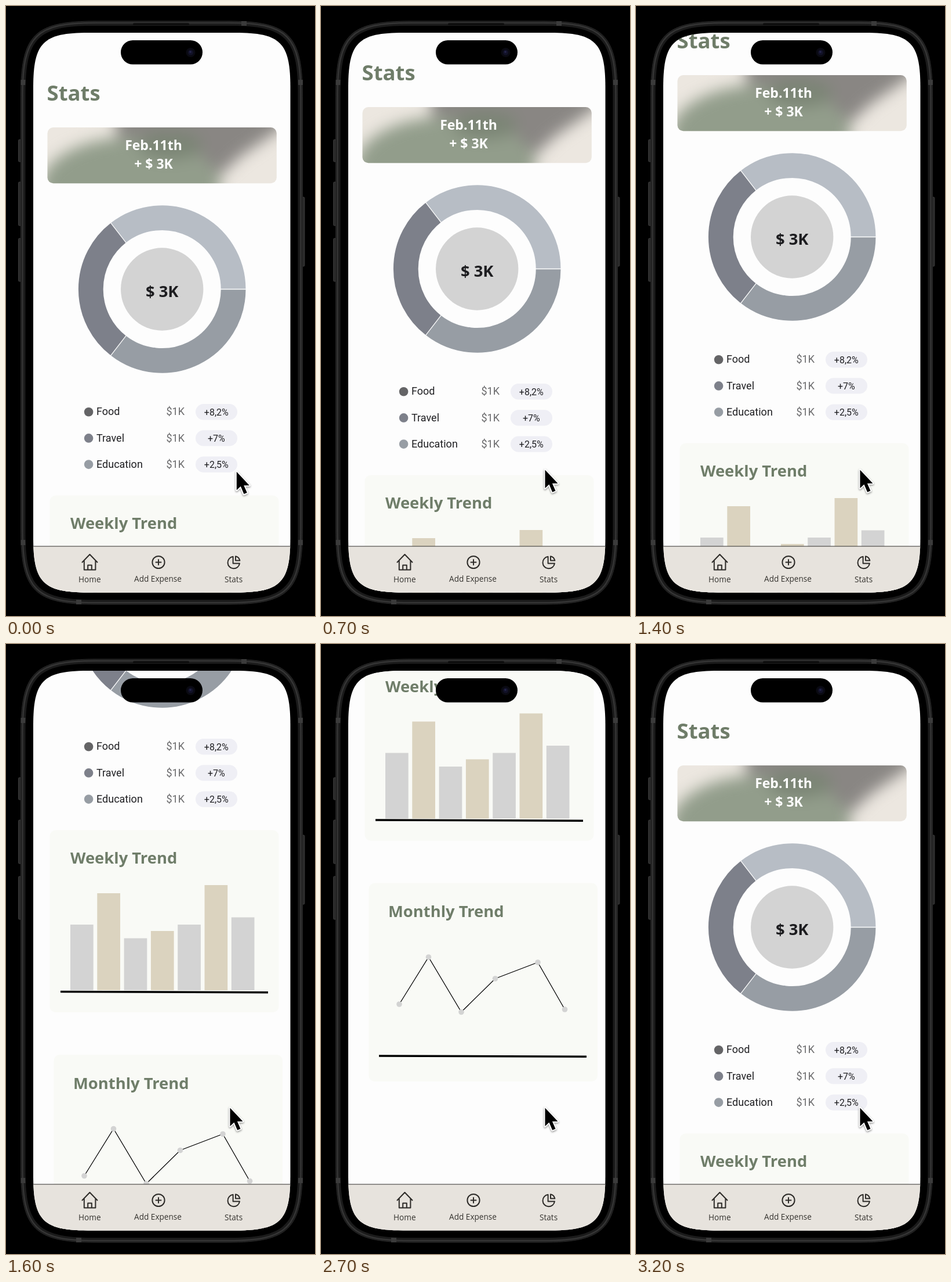
Write an HTML page that moves like this. It is 533 px wide and 1050 px high and loops after 3400 ms.

```html
<!DOCTYPE html>
<html lang="en">
<head>
<meta charset="utf-8">
<title>Stats screen</title>
<style>
  html, body { margin: 0; width: 100%; height: 100%; overflow: hidden; background: #000; }
  svg { display: block; width: 100vw; height: 100vh; }
  text { font-family: "Open Sans", "Noto Sans", sans-serif; white-space: pre; }
  .bold { font-weight: 700; }
  .mid { text-anchor: middle; }
  .head { font-size: 27.4px; fill: #6f7d69; }
  .list text { font-family: Roboto, sans-serif; font-size: 18px; fill: #1f1f22; }
  .list .sum { fill: #68686a; }
  .list .pct { font-size: 16px; }
  .tabs text { font-size: 13.6px; fill: #35332f; text-anchor: middle; }
  .icon { fill: none; stroke: #2d2b28; stroke-width: 2; stroke-linejoin: round; stroke-linecap: round; }
</style>
</head>
<body>
<svg id="stage" viewBox="0 0 533 1050"></svg>
<script>
const LOOP = 3400, STEP = 100;

// [ms, offset] pairs
const SCROLL = [
  [0, 0], [200, 0], [700, 35], [1200, 70], [1300, 77], [1400, 90], [1500, 285],
  [1600, 522], [1700, 715], [1800, 817.5], [2700, 817.5], [2800, 745],
  [2900, 545], [3000, 270], [3100, 70], [3200, 0], [LOOP, 0]
];
// [ms, share of the pointer's path]
const POINTER = [[0, 0], [100, .45], [200, .85], [300, 1], [LOOP, 1]];

const rect = (x, y, w, h, r, fill, more = '') =>
  `<rect x="${x}" y="${y}" width="${w}" height="${h}" rx="${r}" fill="${fill}" ${more}/>`;
const text = (x, y, str, cls = '', more = '') =>
  `<text x="${x}" y="${y}" class="${cls}" ${more}>${str}</text>`;
const disc = (x, y, r, fill) => `<circle cx="${x}" cy="${y}" r="${r}" fill="${fill}"/>`;
const line = (x1, y1, x2, y2, color, width) =>
  `<path d="M${x1} ${y1}L${x2} ${y2}" stroke="${color}" stroke-width="${width}"/>`;

// Rounded box with continuous corners
function squircle(x, y, w, h, r) {
  const e = r * 1.528, c = r * .272, X = x + w, Y = y + h;
  return `M${x + e} ${y}H${X - e}C${X - c} ${y} ${X} ${y + c} ${X} ${y + e}` +
    `V${Y - e}C${X} ${Y - c} ${X - c} ${Y} ${X - e} ${Y}` +
    `H${x + e}C${x + c} ${Y} ${x} ${Y - c} ${x} ${Y - e}` +
    `V${y + e}C${x} ${y + c} ${x + c} ${y} ${x + e} ${y}Z`;
}

function phone() {
  const button = (x, y, h) => rect(x, y, 5, h, 1.5, '#292929', 'stroke="#444" stroke-width=".8"');
  const band = (x, y, w, h) => rect(x, y, w, h, 0, '#3b3b3b');
  return button(21.5, 230, 38) + button(21.5, 303, 75) + button(21.5, 400, 74) + button(510, 329, 119) +
    `<path d="${squircle(25.5, 26, 486, 1004, 85)}" fill="#1b1b1b" stroke="#2b2b2b"/>
     <path d="${squircle(28.5, 29, 480, 998, 82)}" fill="none" stroke="#353535" stroke-width="2.5"/>` +
    band(25.5, 127, 8, 9) + band(504, 127, 8, 9) + band(25.5, 919, 8, 9) + band(504, 919, 8, 9) +
    band(406, 26, 9, 8) + band(121, 1022, 9, 8) +
    `<path d="${squircle(33.5, 34, 470, 988, 77)}" fill="#000"/>` +
    rect(219, 29.5, 97, 3, 1.5, '#0a0a0a');
}

function banner() {
  return `<g clip-path="url(#bannerClip)">` + rect(71, 209, 397, 97, 0, '#ece7e0') +
    `<g filter="url(#soft)">
      <path d="M185 180H500L470 214L405 258L360 300L200 262Z" fill="#898683"/>
      <ellipse cx="215" cy="312" rx="155" ry="86" fill="#929d8b"/>
      <ellipse cx="283" cy="240" rx="55" ry="24" fill="#7b8575"/>
    </g></g>` +
    text(254.5, 248, 'Feb.11th', 'bold mid', 'font-size="23" fill="#fff"') +
    text(254.5, 279.5, '+ $ 3K', 'bold mid', 'font-size="23" fill="#fff"');
}

function donut() {
  const cx = 269.2, cy = 487.5, r = 122.9, half = 21.4, split = 127.8;
  const at = (deg, d) => {
    const a = deg * Math.PI / 180;
    return `${cx + d * Math.cos(a)} ${cy - d * Math.sin(a)}`;
  };
  const arc = (a, b, color) =>
    `<path d="M${at(a, r)}A${r} ${r} 0 0 0 ${at(b, r)}" fill="none" stroke="${color}" stroke-width="${2 * half}"/>`;
  const gap = a =>
    `<path d="M${at(a, r - half - 1)}L${at(a, r + half + 1)}" stroke="#fdfdfd" stroke-width="1.3"/>`;
  return arc(0, split, '#b7bdc5') + arc(split, 360 - split, '#7d808a') + arc(360 - split, 360, '#979da4') +
    [0, split, 360 - split].map(gap).join('') +
    disc(cx, cy, 71.2, '#d3d3d3') +
    text(cx, 500.5, '$ 3K', 'bold mid', 'font-size="27.4" fill="#1d1d20"');
}

function list() {
  const rows = [['Food', '+8,2%', '#646466'], ['Travel', '+7%', '#7d808a'], ['Education', '+2,5%', '#979da4']];
  return '<g class="list">' + rows.map(([name, pct, color], i) => {
    const y = 698.7 + i * 45.2;
    return disc(142.6, y, 7.8, color) + text(156, y + 5.7, name) + text(276.5, y + 5.7, '$1K', 'sum') +
      rect(327, y - 13.7, 72, 27.4, 13.7, '#efeff5') + text(362.8, y + 5.8, pct, 'pct mid');
  }).join('') + '</g>';
}

function weekly() {
  const tops = [1005, 951, 1028.5, 1016, 1005, 937, 992.5], base = 1118;
  return rect(75.5, 842.5, 395, 313.5, 10, '#f9faf6') + text(111, 900, 'Weekly Trend', 'bold head') +
    tops.map((y, i) => rect(111 + i * 46.3, y, 39.7, base - y, 0, i % 2 ? '#dbd3bf' : '#d3d3d3')).join('') +
    line(94, 1120.6, 452, 1121.7, '#000', 3.5);
}

function monthly() {
  const pts = [[135, 1437.5], [185.5, 1356.5], [242, 1451], [300.5, 1393.5], [374, 1365.5], [420.5, 1446.5]];
  return rect(82.5, 1229, 394.5, 341.5, 10, '#f9faf6') + text(116, 1287.5, 'Monthly Trend', 'bold head') +
    `<polyline points="${pts}" fill="none" stroke="#000" stroke-width="1.3"/>` +
    pts.map(([x, y]) => disc(x, y, 4.8, '#d3d3d3')).join('') +
    line(100, 1526.6, 458, 1527.8, '#000', 3.5);
}

function tabs() {
  return '<g class="tabs">' + rect(47, 930, 444, 80, 0, '#e7e3dd') + line(47, 930, 491, 930, '#302f2d', 1.2) +
    `<path class="icon" d="M131.5 957.5L144.5 944L157.5 957.5M134.8 954.5V970.5H154.4V954.5M141.2 970.5V962.5H147.8V970.5"/>
     <path class="icon" d="M252.4 957.5a10.6 10.6 0 1 0 21.2 0a10.6 10.6 0 1 0 -21.2 0M258.5 957.5H267.5M263 953V962"/>
     <path class="icon" d="M391.6 947.8A10.3 10.3 0 1 0 403 959.4H391.6ZM396 947.2A9.5 9.5 0 0 1 403.4 954.6H396Z"/>` +
    text(144.3, 992, 'Home') + text(262, 991, 'Add Expense') + text(392.6, 992, 'Stats') + '</g>';
}

const island = () => rect(198, 59, 141, 41.5, 20.7, '#000') +
  disc(318.5, 80, 8, '#0a0a12') + disc(318.5, 80, 4.5, '#121228') + disc(318, 79, 1.8, '#25254c');

const pointer = () => `<g id="pointer" filter="url(#shade)">
  <path d="M0 0V31.5L7 25L12.6 38.3L18 36L12.4 23.4H22Z" fill="#000" stroke="#fff"
    stroke-width="4" stroke-linejoin="round" paint-order="stroke"/></g>`;

const stage = document.getElementById('stage');
stage.innerHTML = `<defs>
    <clipPath id="screen"><path d="${squircle(47, 46, 443.5, 963.5, 62)}"/></clipPath>
    <clipPath id="bannerClip">${rect(71.5, 209, 395.3, 96.3, 10, '#000')}</clipPath>
    <filter id="soft" filterUnits="userSpaceOnUse" x="0" y="130" width="560" height="330"
      color-interpolation-filters="sRGB"><feGaussianBlur stdDeviation="13"/></filter>
    <filter id="shade" x="-50%" y="-50%" width="200%" height="200%" color-interpolation-filters="sRGB">
      <feDropShadow dx="0" dy="1.5" stdDeviation="1.6" flood-opacity=".42"/></filter>
  </defs>` + phone() +
  `<g clip-path="url(#screen)">` + rect(47, 46, 444, 964, 0, '#fdfdfd') +
  `<g id="page">` + text(70.5, 163, 'Stats', 'bold', 'font-size="36.6" fill="#6f7d69"') +
  banner() + donut() + list() + weekly() + monthly() + '</g>' + tabs() + '</g>' + island() + pointer();

const page = document.getElementById('page');
const arrow = document.getElementById('pointer');

function sample(keys, t) {
  const i = keys.findIndex(k => k[0] > t);
  const [t0, a] = keys[i - 1], [t1, b] = keys[i];
  return a + (b - a) * (t - t0) / (t1 - t0);
}

function draw(ms) {
  const t = Math.floor(ms % LOOP / STEP) * STEP;
  const p = sample(POINTER, t);
  page.setAttribute('transform', `translate(0 ${-sample(SCROLL, t)})`);
  arrow.setAttribute('transform', `translate(${397.8 - 11.3 * p} ${801.8 - 3.4 * p})`);
}

const start = performance.now();
function tick() {
  draw(performance.now() - start);
  requestAnimationFrame(tick);
}
tick();
</script>
</body>
</html>
```
